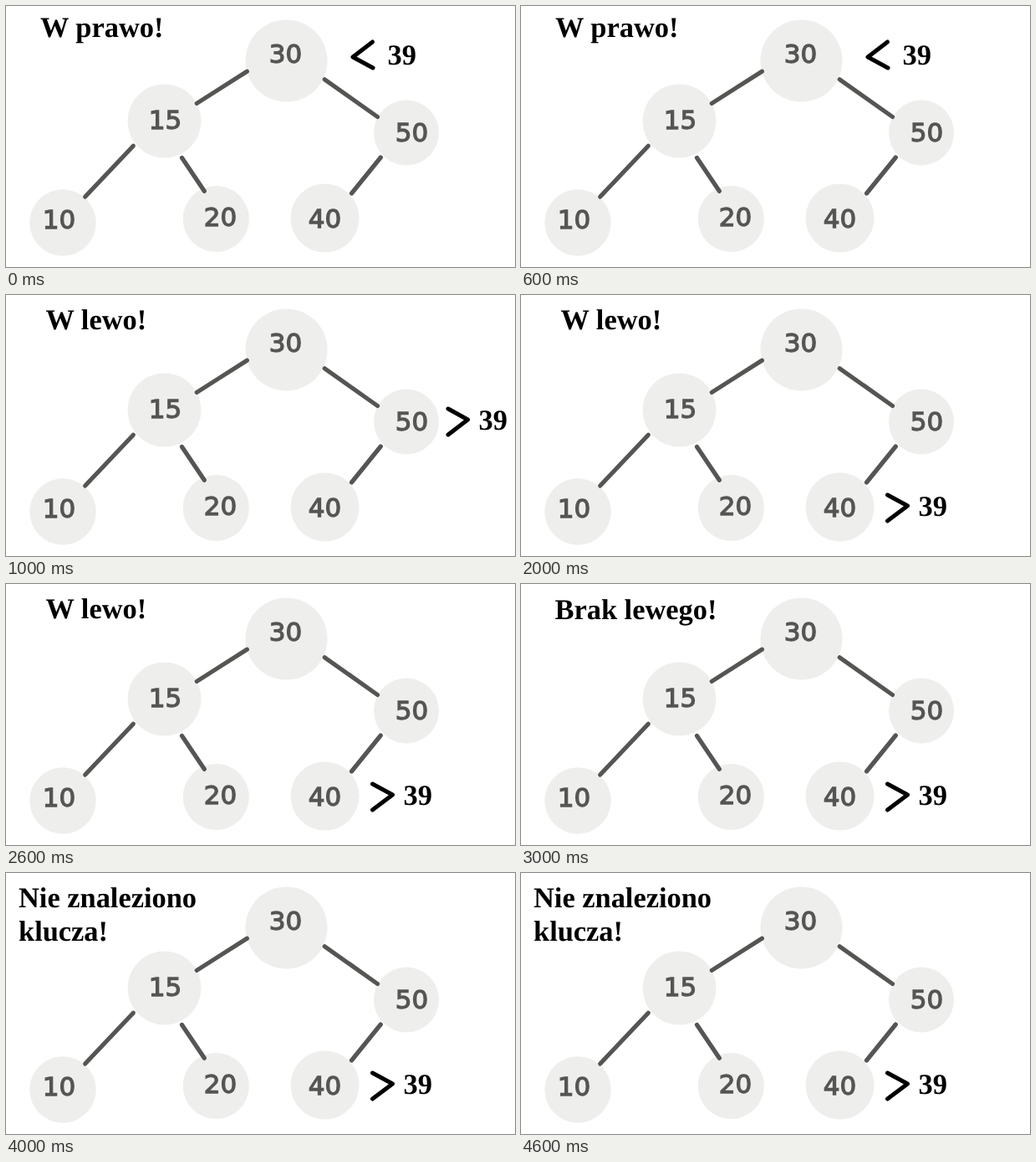
An HTML page for the animation above (5000 ms loop, 609 px wide and 312 px high).

```html
<!DOCTYPE html>
<html lang="pl">
<head>
<meta charset="utf-8">
<title>Szukanie klucza w drzewie</title>
<style>
  html, body { margin: 0; width: 100%; height: 100%; overflow: hidden; background: #fff; }
  svg { display: block; width: 609px; height: 312px; }
  .node { fill: #eeeeec; }
  .edge { stroke: #555553; stroke-width: 5.2; stroke-linecap: round; }
  .key { font: 31px "DejaVu Sans", sans-serif; text-anchor: middle; fill: #555553; stroke: #555553; stroke-width: 1.3; }
  .note { font: bold 34.4px "Liberation Serif", "Times New Roman", serif; fill: #000; text-rendering: geometricPrecision; }
  .sign { fill: none; stroke: #000; stroke-width: 5; stroke-linecap: round; stroke-linejoin: round; }
</style>
</head>
<body>
<svg id="stage" viewBox="0 0 609 312"></svg>
<script>
const STEP = 1000;
const stage = document.getElementById("stage");

function add(tag, attrs, text = "") {
  const el = document.createElementNS("http://www.w3.org/2000/svg", tag);
  for (const name in attrs) el.setAttribute(name, attrs[name]);
  el.textContent = text;
  return stage.appendChild(el);
}

// Circle centre and radius, then label centre and baseline
const nodes = [
  { key: 30, cx: 335.5, cy: 65.5, r: 49, x: 334.5, y: 68 },
  { key: 15, cx: 189.5, cy: 137.5, r: 44, x: 190.5, y: 147 },
  { key: 50, cx: 479, cy: 151.5, r: 39, x: 485.5, y: 162 },
  { key: 10, cx: 68, cy: 259, r: 39.7, x: 63.5, y: 266 },
  { key: 20, cx: 251.3, cy: 254.5, r: 39.6, x: 256.5, y: 263 },
  { key: 40, cx: 381.5, cy: 253.5, r: 41, x: 381.5, y: 265 }
];
const edges = [
  "M288.3 78.2L228.3 116.4", "M381.3 87.8L444.5 132.5", "M152.3 167.2L94.7 228",
  "M210.5 181.5L237.3 221.3", "M448.3 181L413.5 224"
];

nodes.forEach(({ cx, cy, r }) => add("circle", { class: "node", cx, cy, r }));
edges.forEach(d => add("path", { class: "edge", d }));
nodes.forEach(({ key, x, y }) => add("text", { class: "key", x, y }, key));

const lines = [0, 1].map(() => add("text", { class: "note" }));
const sign = add("path", { class: "sign" });
const sought = add("text", { class: "note" }, "39");

const atRoot = { d: "M438.5 43L415 61L439 74", x: 456.5, y: 70 };
const atRight = { d: "M529 136L552.5 149L529 167", x: 565.5, y: 161 };
const atLeaf = { d: "M438.5 239L462.5 252L438.5 270", x: 475.5, y: 264 };
const steps = [
  { at: atRoot, x: 41, y: 37, text: ["W prawo!"] },
  { at: atRight, x: 47.5, y: 41, text: ["W lewo!"] },
  { at: atLeaf, x: 47.5, y: 41, text: ["W lewo!"] },
  { at: atLeaf, x: 40.5, y: 42, text: ["Brak lewego!"] },
  { at: atLeaf, x: 15, y: 41, text: ["Nie znaleziono", "klucza!"] }
];

function place(el, x, y) {
  el.setAttribute("x", x);
  el.setAttribute("y", y);
}

let shown = -1;
function render(time) {
  const index = Math.floor(time / STEP) % steps.length;
  if (index !== shown) {
    shown = index;
    const { at, x, y, text } = steps[index];
    lines.forEach((line, i) => {
      place(line, x, y + 40 * i);
      line.textContent = text[i] || "";
    });
    sign.setAttribute("d", at.d);
    place(sought, at.x, at.y);
  }
}

const start = performance.now();
function tick() {
  render(performance.now() - start);
  requestAnimationFrame(tick);
}
tick();
</script>
</body>
</html>
```
